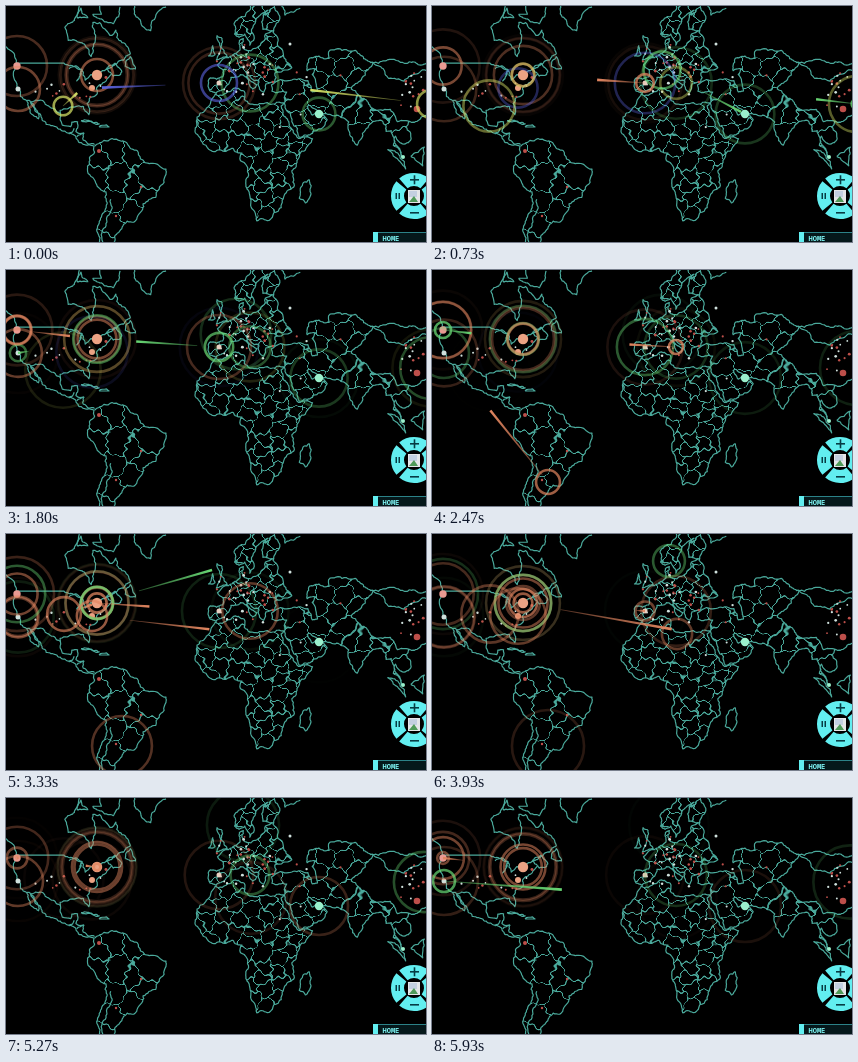
These frames come from a looping animation (420 by 236 pixels, 5.99 s). An HTML page with a canvas:

```html
<!DOCTYPE html>
<html lang="en">
<head>
<meta charset="utf-8">
<title>Attack map</title>
<style>
html, body { margin: 0; width: 420px; height: 236px; overflow: hidden; background: #000; }
canvas { display: block; }
</style>
</head>
<body>
<canvas id="stage" width="420" height="236"></canvas>
<script>
const W = 420, H = 236, LOOP = 5990, STEPS = 90, TAU = Math.PI * 2;
const LINE = '#4aa99b', CYAN = '#62eef0';
const stage = document.getElementById('stage').getContext('2d');
const mapCanvas = document.createElement('canvas');
mapCanvas.width = W;
mapCanvas.height = H;
const map = mapCanvas.getContext('2d');

let seed = 11;
const rnd = () => (seed = seed * 16807 % 2147483647) / 2147483647;
const clamp = v => Math.max(0, Math.min(1, v));

// Mercator projection, longitude and latitude in degrees
const project = (lon, lat) =>
  [219.5 + 1.7 * lon, 153 - 97.4 * Math.log(Math.tan(Math.PI / 4 + lat * Math.PI / 360))];

// Roughen a segment by midpoint displacement
function crinkle(path, x1, y1, x2, y2) {
  const dx = x2 - x1, dy = y2 - y1;
  if (Math.hypot(dx, dy) < 2.4) return path.lineTo(x2, y2);
  const k = (rnd() - .5) * .36;
  const mx = (x1 + x2) / 2 - dy * k, my = (y1 + y2) / 2 + dx * k;
  crinkle(path, x1, y1, mx, my);
  crinkle(path, mx, my, x2, y2);
}

// Coast through a few key points; countries is the number of cells inside
function land(text, countries = 0) {
  const n = text.split(' ').map(Number), path = new Path2D();
  let [x, y] = project(n[0], n[1]);
  path.moveTo(x, y);
  for (let i = 2; i < n.length; i += 2) {
    const [u, v] = project(n[i], n[i + 1]);
    if (n[i + 1] === n[i - 1]) path.lineTo(u, v);
    else crinkle(path, x, y, u, v);
    [x, y] = [u, v];
  }
  map.stroke(path);
  if (countries) drawBorders(path, countries);
}

// Borders are the edges of evenly spread, slightly warped Voronoi cells
function drawBorders(path, count) {
  const inside = (x, y) => map.isPointInPath(path, x, y);
  const sites = [];
  const gap = (x, y) => Math.min(...sites.map(s => Math.hypot(s[0] - x, s[1] - y)));
  while (sites.length < count) {
    let best, bestGap = -1;
    for (let tries = 0; tries < 400; tries++) {
      const x = rnd() * W, y = rnd() * H;
      if (inside(x, y) && gap(x, y) * (.6 + rnd() * .4) > bestGap) {
        best = [x, y];
        bestGap = gap(x, y);
      }
    }
    if (best) sites.push(best);
  }
  map.fillStyle = LINE;
  for (let y = 0; y < H; y++) for (let x = 0; x < W; x++) {
    if (!inside(x + .5, y + .5)) continue;
    const wx = x + Math.sin(y * .8) + Math.sin(x * .31 + y * .2), wy = y + Math.sin(x * .7) + Math.sin(y * .37);
    let near = 1e9, next = 1e9;
    for (const [sx, sy] of sites) {
      const d = Math.hypot(sx - wx, sy - wy);
      if (d < near) [near, next] = [d, near];
      else if (d < next) next = d;
    }
    map.globalAlpha = clamp(1.5 - (next - near));
    map.fillRect(x, y, 1, 1);
  }
  map.globalAlpha = 1;
}

function dot(g, x, y, r, color) {
  g.fillStyle = color;
  g.beginPath();
  g.arc(x, y, r, 0, TAU);
  g.fill();
}

function drawLand() {
  map.strokeStyle = LINE;
  map.lineWidth = 1.2;
  map.lineJoin = 'round';
  // North America: Pacific, Gulf and Atlantic, Canada, borders
  land('-130 55 -123 49 -124 42 -120.6 34.5 -117 32.5 -110 23 -114.7 31.7 -109 25.5 -105.5 20 -94.5 16.2 -88 13 -83.5 8.5 -77.5 7.5');
  land('-77 8.5 -83.7 11 -83.3 15 -88 16 -87 21.4 -90.4 21.2 -91 18.7 -96 19.5 -97.3 27.5 -89 29.2 -83.5 29.5 -80.4 25.2 -81.4 31 -75.8 35.4 -74 40 -70.2 41.7 -67 44.8');
  land('-67 44.8 -66 43.8 -61 45.5 -65 49 -70 47 -60 50.2 -56 52.5 -64.5 60.2 -68 58.6 -74 62.3 -78 62.4 -76.6 57 -79 51.5 -82.3 55.2 -92.5 57 -94.5 61 -87 64.5 -86 66.5');
  land('-123 49 -95 49 -84.5 46.5 -82.5 42 -74.7 45 -70 46.7 -67 44.8');
  land('-92 46.7 -84.5 46.5 -87.5 41.7 -85 46');
  land('-117 32.5 -106.5 31.7 -103 29 -97.3 25.9');
  land('-92.2 14.5 -89 17.8');
  land('-87.5 13 -83.2 15');
  // Northern islands and the Caribbean
  land('-74 66.5 -73 64.5 -78 64.5 -66 62 -64.5 63.3 -62 66.3');
  land('-87 63.5 -81 63.6 -85 66 -87 63.5');
  land('-53.5 67 -48 61 -44 60 -40 65 -35 66.3');
  land('-59 47.7 -56 51.5 -53 46.7 -59 47.7');
  land('-85 22 -77 21 -74.3 20.2 -78 20.8 -85 22');
  land('-74.4 18.5 -70 19.7 -68.5 18.5 -74.4 18.5');
  // South America
  land('-77.5 7.5 -77 4 -80 1 -81.2 -6 -76.3 -14 -70.3 -19 -71.5 -30 -73.8 -42 -74.5 -45 -67 -45.5 -65 -41 -62.3 -39 -57.8 -34.3 -54 -34.8 -48.7 -28.3 -48.5 -25.5 -41 -22 -39 -17.5 -35 -9 -35 -6 -44 -2.6 -50 0 -52 5 -62 10.7 -71.5 10.9 -77.5 7.5', 12);
  land('-67.5 -23 -70 -33 -71.7 -45');
  // Africa
  land('-6 35.8 -10 29.5 -17 21 -17.3 14.7 -13.2 8.8 -7.6 4.4 4.4 6.3 9.7 3.5 8.8 -1 13.5 -8.5 12 -16 15 -27 18.4 -34.2 25.6 -34 32.8 -27.5 35 -20 40.5 -15.5 39 -7 42 -1 51.2 11.8 43 12 37.3 19 32.7 29.8 34.3 31.3 29 30.8 20 31 19 30.3 11 33.2 11 37 -2 35 -6 35.8', 46);
  land('49.3 -12 50.4 -15.5 47 -25 43.4 -22.5 44 -17 49.3 -12');
  // Europe
  land('14.5 67 5 62 5.3 59 8 58 11.3 59 14.3 55.5 16.5 57 17.3 62 25 65.5 21.3 62.5 22 60.4 28 60 23.5 59 18.5 54.6 11 54 10.5 57.6 8.2 57 8.5 53.8 4 51.8 -4.7 48.4 -1.2 46 -1.7 43.4 -9 43 -9 37 -5.5 36 0 38.8 3.2 43.2 8.8 44.4 16 38 18.5 40 12.3 45.3 19.4 41.8 22.5 36.5 23.8 40.4 29 41.2 29 45 39 47.2 35.5 50.4 31 55 28 59.5 31.5 62.8 29 67', 34);
  land('-5.5 50 1.3 51.2 -2 57.6 -5 58.5 -3 53.5 -5.5 50');
  land('-6 52.2 -10 51.7 -7.5 55.3 -6 52.2');
  land('33 66.6 35 64.3 40 65 44 66');
  // West Asia, South Asia, the Far East
  land('27 40 36 41.7 44 42.6 48.5 41.8 51 36.7 54 37 53 41.5 51 44.5 53 46.8 48 46 49 50.5 61 50.8 61.5 53.8 71 54 77 53.5 87 49.2 80 42.3 74 38 78 35.5 70 28 68 23.7 57 26 50 30 48 29.5 51 25 56.3 26.2 59.8 22.5 55 17.5 43.4 12.7 39 21.5 35 29 36 36.6 27.3 37 27 40', 18);
  land('78 35.5 70 28 68 23.7 72.5 21.3 77.5 8.1 82.3 16.8 88 21.7 92 22 94.5 16 97.5 16.5 98.7 8 103.5 1.4 99.5 9.5 100 13.3 105 8.7 109.2 12 106 18.5 108 21.6 101 21.5 97 28 88 27.9 78 35.5', 8);
  land('87 49.2 98 50.5 108 49.5 119 49');
  land('87 49.2 96 42.8 105 41.6 119 46');
  land('108 21.6 114 22.5 119.5 26');
  land('95.3 5.6 106 -5.8 98.7 1.7 95.3 5.6');
  land('109 1.5 117 7 116 -4 109 1.5');
}

const places = {
  seattle: [11, 60], la: [12, 83], texas: [58, 80], gulf: [57, 100], ny: [91, 69], plata: [116, 212],
  carolina: [86, 82], madrid: [213, 77], london: [230, 64], oslo: [237, 27], rome: [244, 77],
  tunis: [245, 100], dubai: [313, 108], china: [418, 84], east: [425, 98]
};
const colors = { o: '226,134,96', g: '104,216,116', y: '212,224,100', b: '92,100,225' };

function drawCities() {
  const red = '#bd4f4a', white = '#cfe0dc', mint = '#9af0cc', salmon = '#eba283';
  // Loose clusters: centre, spread, count
  for (const [x, y, w, h, n] of [[238, 63, 32, 28, 34], [60, 84, 50, 14, 14], [408, 86, 20, 26, 16], [290, 90, 60, 36, 8]])
    for (let i = 0; i < n; i++)
      dot(map, x + (rnd() + rnd() - 1) * w, y + (rnd() + rnd() - 1) * h, .8 + rnd() * .7, i % 2 ? red : white);
  dot(map, 93, 145, 2, red);
  dot(map, 135, 181, 1.2, red);
  dot(map, 110, 210, 1.2, red);
  dot(map, 284, 38, 1.5, white);
  dot(map, 411, 103, 3.3, red);
  dot(map, 397, 151, 2, mint);
  const city = (name, r, color) => dot(map, ...places[name], r, color);
  city('madrid', 2.5, '#e8cfc0');
  city('la', 2.5, white);
  city('carolina', 3, salmon);
  city('seattle', 3.7, '#e99a92');
  city('dubai', 4.2, mint);
  city('ny', 5.2, salmon);
}

// Colour, origin, destination and launch time of every shot
const shots = `
o ny madrid -1850; o madrid ny -1790; g rome dubai -1090; b madrid carolina -553; y east rome -400; y gulf ny -250
g london dubai 94; o madrid ny 430; g east rome 530; g ny la 980
g madrid ny 1390; o seattle ny 1400; o plata la 2130; g seattle ny 2250; o rome ny 2280
o texas ny 2820; g ny oslo 2855; o carolina tunis 2885; o ny madrid 3070
o ny dubai 3525; g china rome 4047; o ny seattle 4375; o ny seattle 5174; g la tunis 5620`
  .trim().split(/[;\n]/).map(row => {
    const [color, from, to, start] = row.trim().split(' ');
    return { rgb: colors[color], from: places[from], to: places[to], start: +start };
  });

// Busy places also pulse steadily: period and first pulse
const hubs = { ny: [830, -2134], seattle: [1290, -1204], la: [1700, -726] };
const FLIGHT = 600;

function drawRing(age, rgb, [x, y], strength) {
  if (age < 0 || age > 2800) return;
  stage.strokeStyle = `rgba(${rgb},${strength * (1 - age / 2800) ** 1.5})`;
  stage.lineWidth = 2.6;
  stage.beginPath();
  stage.arc(x, y, 44 * (1 - Math.exp(-age / 1050)), 0, TAU);
  stage.stroke();
}

// A comet: thick bright head, thin tail leaving half a flight later
function drawComet(age, rgb, [x1, y1], [x2, y2]) {
  const head = clamp(age / FLIGHT), tail = clamp(age / FLIGHT - .5);
  if (head <= tail) return;
  const dx = x2 - x1, dy = y2 - y1, len = Math.hypot(dx, dy);
  const nx = -dy / len * 1.3, ny = dx / len * 1.3;
  const ax = x1 + dx * tail, ay = y1 + dy * tail, bx = x1 + dx * head, by = y1 + dy * head;
  const glow = stage.createLinearGradient(ax, ay, bx, by);
  glow.addColorStop(0, `rgba(${rgb},.35)`);
  glow.addColorStop(1, `rgb(${rgb})`);
  stage.fillStyle = glow;
  stage.beginPath();
  stage.moveTo(ax + nx * .25, ay + ny * .25);
  stage.lineTo(bx + nx, by + ny);
  stage.lineTo(bx - nx, by - ny);
  stage.lineTo(ax - nx * .25, ay - ny * .25);
  stage.fill();
}

function box(color, x, y, w, h) {
  stage.fillStyle = color;
  stage.fillRect(x, y, w, h);
}

function drawControls() {
  const ink = '#063c44';
  dot(stage, 408, 190, 24, '#000');
  stage.strokeStyle = CYAN;
  stage.lineWidth = 13;
  for (let i = 0; i < 4; i++) {
    const mid = i * TAU / 4;
    stage.beginPath();
    stage.arc(408, 190, 16.5, mid - .7, mid + .7);
    stage.stroke();
  }
  box(ink, 404, 173, 9, 1.6);
  box(ink, 407.7, 169.3, 1.6, 9);
  box(ink, 404, 206, 9, 1.6);
  box(ink, 389.5, 187, 1.5, 6);
  box(ink, 392.5, 187, 1.5, 6);
  // Missing-picture sign
  box('#e4e6e8', 402, 184, 12, 13);
  box('#c3cfe0', 403, 185, 8, 6);
  stage.fillStyle = '#4f9a58';
  stage.beginPath();
  stage.moveTo(403, 196);
  stage.lineTo(408, 190);
  stage.lineTo(412, 196);
  stage.fill();
  // Title bar
  box('#05181b', 367, 226, 53, 10);
  box('#2c8288', 367, 226, 53, 1);
  box(CYAN, 367, 226, 5, 10);
  stage.fillStyle = '#7df2f2';
  stage.font = 'bold 7px "Noto Sans Mono", "Liberation Mono", monospace';
  stage.fillText('HOME', 376.5, 234.5);
}

function frame(now) {
  const t = Math.floor(now % LOOP / LOOP * STEPS) * LOOP / STEPS;
  box('#000', 0, 0, W, H);
  stage.drawImage(mapCanvas, 0, 0);
  for (const [name, [period, first]] of Object.entries(hubs))
    for (let start = first; start <= t; start += period) drawRing(t - start, colors.o, places[name], .75);
  for (const { rgb, from, to, start } of shots) {
    const age = t - start;
    drawRing(age, rgb, from, .85);
    drawRing(age - FLIGHT, rgb, to, .55);
    drawComet(age, rgb, from, to);
  }
  drawControls();
}

drawLand();
drawCities();
const origin = performance.now();
(function tick() {
  frame(performance.now() - origin);
  requestAnimationFrame(tick);
})();
</script>
</body>
</html>
```
